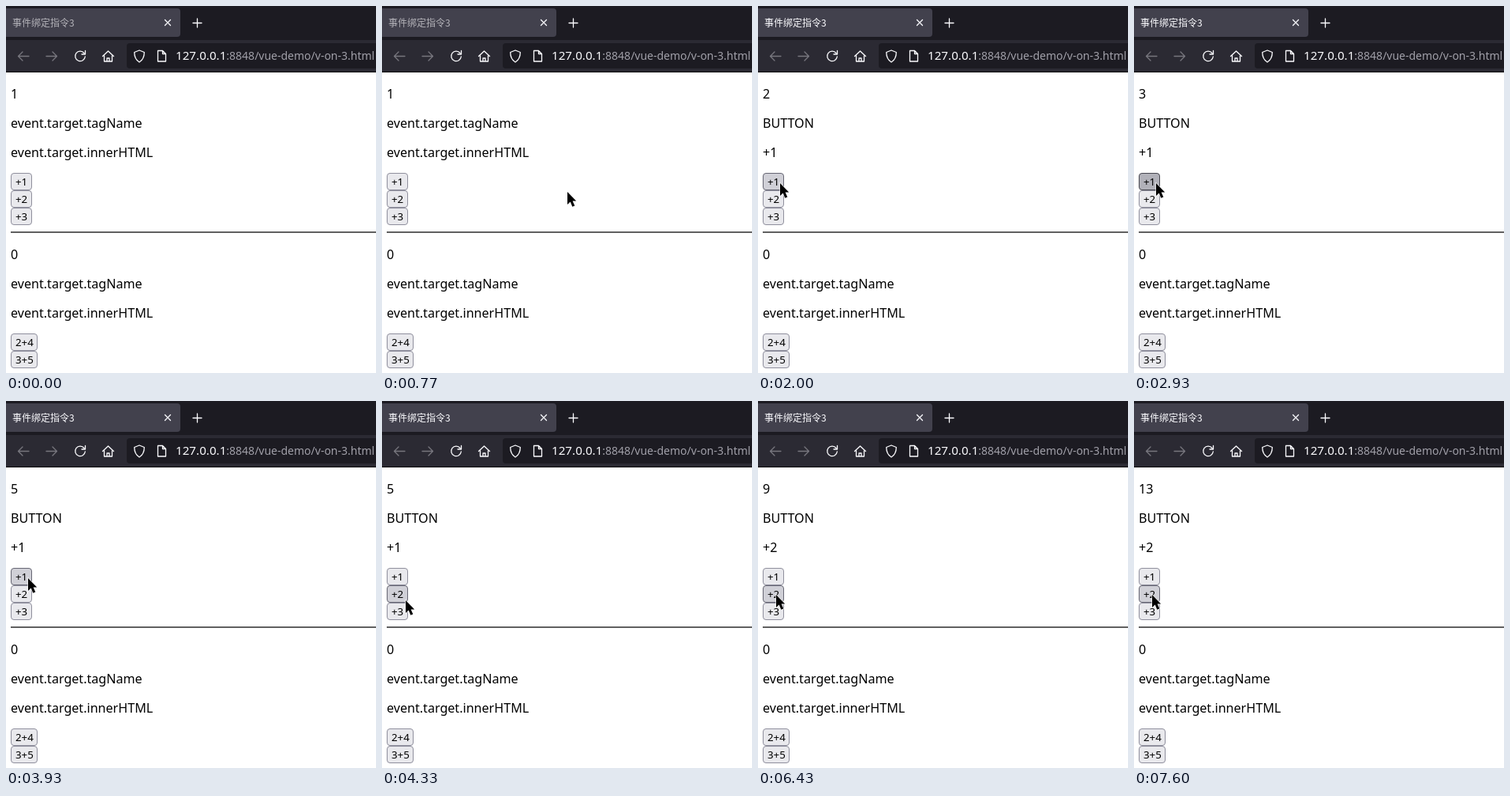
An HTML page that plays this animation: 469x464 px, repeating every 8000 ms.

```html
<!DOCTYPE html>
<html lang="zh">
<head>
<meta charset="utf-8">
<title>事件绑定指令3</title>
<style>
  html, body { margin: 0; width: 100%; height: 100%; overflow: hidden; background: #fff; }
  svg { display: block; }
  text { font: 16.1px "Noto Sans", "Open Sans", sans-serif; }
  .button text { font-size: 13.33px; }
  .button rect { fill: #e9e9ed; stroke: #8f8f9d; }
  .button.hover rect { fill: #d0d0d7; stroke: #676774; }
  .button.active rect { fill: #b1b1b9; stroke: #484851; }
  #title { font: 12px "Noto Sans CJK SC", "Noto Sans CJK", "Noto Sans", sans-serif; }
  .icons { fill: none; stroke: #fbfbfe; stroke-width: 1.3; stroke-linecap: round; stroke-linejoin: round; }
  .icons .off { stroke: #77767e; }
</style>
</head>
<body>
<svg width="469" height="464" viewBox="0 0 469 464">
  <rect width="469" height="43" fill="#1c1b22"/>
  <rect x="-6" y="3" width="227" height="36" rx="4" fill="#42414d"/>
  <rect y="43" width="469" height="41" fill="#2b2a33"/>
  <rect y="83" width="469" height="1" fill="#0c0c0d"/>
  <rect x="153" y="47" width="330" height="32" rx="4" fill="#1c1b22"/>
  <text id="title" x="8" y="26">事件绑定指令3</text>
  <g class="icons">
    <path d="M201.5 17.5l7 7m0-7l-7 7M237 21.5h11M242.5 16v11"/>
    <path class="off" d="M29 63.5H15.500m5.500-5.500l-5.500 5.500 5.500 5.500M51 63.500h13.500m-5.500-5.500l5.500 5.500-5.500 5.500"/>
    <path d="M99 59.500A6.300 6.300 0 1 0 100.300 64M100.500 56.500v4.500h-4.500"/>
    <path d="M122.500 63.500l7-6.500 7 6.500M124.500 62.500v7.500h10v-7.500M128 70v-4h3v4"/>
    <path d="M169 56l6.300 2.500c0 6-1.500 9.500-6.300 12.500-4.800-3-6.300-6.500-6.300-12.500z"/>
    <path d="M192.500 56.500h6l4 4v9.500h-10zM198.500 56.500v4h4"/>
  </g>
  <text x="215" y="68" fill="#fbfbfe" style="font-size:15.2px">127.0.0.1<tspan fill="#a09fa8" style="font-size:14px">:8848/vue-demo/v-on-3.html</tspan></text>

  <text id="count" x="6" y="117"/>
  <text id="tag" x="6" y="154"/>
  <text id="inner" x="6" y="191"/>
  <rect x="6" y="285" width="463" height="2" fill="#606060"/>
  <text x="6" y="320">0</text>
  <text x="6" y="357">event.target.tagName</text>
  <text x="6" y="394">event.target.innerHTML</text>
  <g id="buttons"/>
  <path id="cursor" d="M0 0V16l3.700-3.400 2.600 6.200 3-1.200-2.700-6h4.600z" stroke="#fff" stroke-width="1.200" paint-order="stroke"/>
</svg>
<script>
const LOOP = 8000;
const $ = id => document.getElementById(id);

const buttons = [['+1', 211, 27], ['+2', 233, 27], ['+3', 255, 27], ['2+4', 414, 34], ['3+5', 436, 34]]
  .map(([label, y, width]) => ({ label, y, width }));
$('buttons').innerHTML = buttons.map(({ label, y, width }) => `<g class="button">
  <rect x="6.5" y="${y + 0.5}" width="${width - 1}" height="21" rx="3.5"/>
  <text x="12" y="${y + 16}">${label}</text></g>`).join('');
const nodes = [...document.querySelectorAll('.button')];

// Pointer path: time, x, y
const path = [
  [500, 443, 290], [600, 358, 258], [770, 236, 235], [1000, 120, 227], [1300, 45, 224],
  [1330, 45, 224], [1500, 33, 224], [1670, 33, 224], [1770, 28, 224], [3930, 28, 224],
  [4130, 35, 236], [4350, 29, 253], [4600, 23, 245], [LOOP, 23, 245]
];
// Clicks: press time, release time, amount
const clicks = [
  [1900, 2000, 1], [2470, 2570, 1], [2930, 3030, 1], [3430, 3530, 1],
  [4900, 4970, 2], [6330, 6430, 2], [6930, 7000, 2], [7530, 7600, 2]
];

function pointerAt(t) {
  const i = Math.max(1, path.findIndex(p => p[0] > t));
  const [t0, x0, y0] = path[i - 1], [t1, x1, y1] = path[i];
  const k = (t - t0) / (t1 - t0);
  return [Math.round(x0 + (x1 - x0) * k), Math.round(y0 + (y1 - y0) * k)];
}

function render(t) {
  const visible = t >= path[0][0];
  const [x, y] = pointerAt(t);
  $('cursor').setAttribute('visibility', visible ? 'visible' : 'hidden');
  $('cursor').setAttribute('transform', `translate(${x} ${y})`);

  const pressed = clicks.some(([down, up]) => t >= down && t < up);
  buttons.forEach((b, i) => {
    const over = visible && x >= 6 && x < 6 + b.width && y >= b.y && y < b.y + 22;
    nodes[i].classList.toggle('hover', over);
    nodes[i].classList.toggle('active', over && pressed);
  });

  const done = clicks.filter(c => t >= c[1]);
  const last = done[done.length - 1];
  $('count').textContent = done.reduce((sum, c) => sum + c[2], 1);
  $('tag').textContent = last ? 'BUTTON' : 'event.target.tagName';
  $('inner').textContent = last ? '+' + last[2] : 'event.target.innerHTML';
  $('title').setAttribute('fill', t >= clicks[0][0] ? '#fbfbfe' : '#b3b2b8');
}

const start = performance.now();
function tick() {
  render((performance.now() - start) % LOOP);
  requestAnimationFrame(tick);
}
tick();
</script>
</body>
</html>
```
